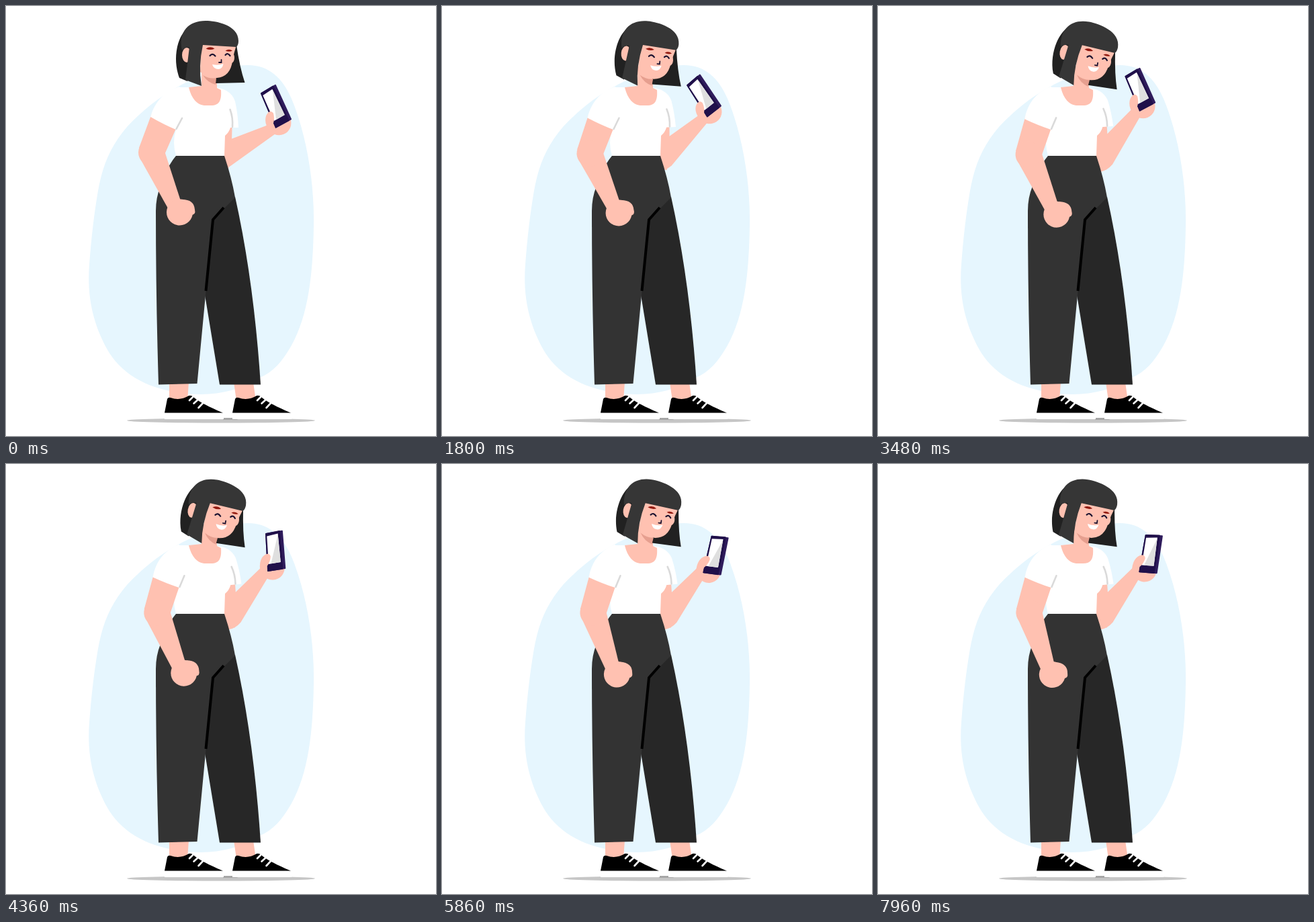
Write an HTML page that moves like this. It is 640 by 640 pixels and loops after 8 s.

```html
<!DOCTYPE html>
<html lang="en">
<head>
<meta charset="utf-8">
<title>Woman with phone</title>
<style>
  html, body { margin: 0; width: 100%; height: 100%; overflow: hidden; background: #fff; }
  svg { display: block; width: 100vw; height: 100vh; }
  .skin { fill: #ffc1b1; }
  .white { fill: #fff; }
  .hair { fill: #363636; }
  .back { fill: #212121; }
  .fold { fill: none; stroke: #dadada; stroke-width: 2.6; stroke-linecap: round; }
  .line { fill: none; stroke-linecap: round; }
</style>
</head>
<body>
<svg viewBox="0 0 640 640">
  <path fill="#e6f6fe" d="M360 88C392 88 412 108 425 138C447 190 459 262 458 325C457 400 450 460 425 505C412 528 398 545 378 553C350 570 322 578 290 578C225 577 174 554 150 510C126 466 121 425 124 385C127 345 131 310 137 275C144 235 157 207 180 180C210 148 245 122 290 104C315 94 340 88 360 88Z"/>
  <ellipse cx="320" cy="617" rx="140" ry="3.6" fill="#c6c6c6"/>
  <path fill="#a6a6a6" d="M323 613h14l9 3h-23z"/>

  <!-- far arm -->
  <g id="farUpper">
    <path class="skin" d="M318 165H337L336 200Q338 222 330 245L318 240Z"/>
    <path class="white" d="M305 121Q334 121 341 142Q345 160 346 181H328Z"/>
  </g>
  <path id="farFore" class="skin" d="M78 -7L0 -17H-18L-30 12Q-22 19 -10 19.500L78 8Z"/>
  <g id="hand">
    <circle class="skin" cx="8" cy="-5" r="18"/>
    <g stroke-width="2" stroke-linejoin="round">
      <path fill="#2f1c5c" stroke="#2f1c5c" d="M1 -1V-56L25 -59L26.500 -3.500Z"/>
      <path fill="#20104a" stroke="#20104a" d="M1 -1V-56L21 -59L22.500 -3Z"/>
    </g>
    <path class="white" d="M2 -52.500L18.500 -55.500L20.500 -13L2.500 -11Z"/>
    <path fill="#dfdfdf" d="M18.500 -54L20.500 -13L6 -11.400Z"/>
    <path class="skin" d="M6 -22Q5 -27 0 -26Q-6 -24 -9 -17Q-12 -10 -10 2L0 1V-8Q5 -14 6 -22Z"/>
  </g>

  <!-- legs -->
  <path class="skin" d="M243 560H272L270 588H243ZM339 560H368L372 588H343Z"/>
  <g id="shoe">
    <path class="white" d="M236 605H324V615H236Z"/>
    <path d="M236 605.500L240 585Q241 582 245 583Q259 588 272 580Q276 579 279 582C286 588 296 594 323 605.500Z"/>
    <path class="line" stroke="#fff" stroke-width="2.6" d="M273 587L278 582M279.500 591.500L285 586.500M286.500 598L293.500 590.500"/>
  </g>
  <use href="#shoe" x="101"/>
  <path fill="#272727" d="M341 284Q369 410 379 563.500H318L296 430L308 316Z"/>
  <path fill="#333" d="M253 223H325Q336 256 341 285L308 318L297 430L284.500 562L227 563.500Q223 430 223 305Q223 285 230 268Q240 238 253 223Z"/>
  <path fill="none" stroke="#000" stroke-width="4" d="M324 300L308 318L297.500 424"/>

  <!-- torso and neck -->
  <path class="white" d="M256 121H312Q328 124 332 150L334 181Q332 188 326 193L325 223H253Q247 203 253 184Z"/>
  <path id="farFold" class="fold" d="M333.500 154Q338 166 337 180"/>
  <path class="skin" d="M272 121L291 119V90H314V122L320 125C321 140 318 148 305 148H297C285 148 276 138 272 121Z"/>

  <!-- near arm -->
  <g id="nearUpper">
    <g id="nearFore" class="skin">
      <path d="M199 226L241 301L260 290L236 216Z"/>
      <circle cx="258.500" cy="307" r="19.500"/>
      <path d="M262 288Q280 288 281 303Q283 311 275 311Z"/>
    </g>
    <path class="skin" d="M217 160L198 211L216 232L236 221L255 178Z"/>
    <circle class="skin" cx="216.500" cy="218" r="19.500"/>
    <path class="white" d="M258 120C238 126 222 140 215 165Q236 177 253 184L262 167L275 140Z"/>
    <path class="fold" d="M262 167L253.500 183"/>
  </g>

  <g id="head">
    <path class="back" d="M268 36C258 42 246 75 258 107L270 112L290 60ZM343 58Q348 92 355.500 114L312 115V60Z"/>
    <ellipse class="skin" cx="269" cy="73" rx="7" ry="11"/>
    <ellipse class="skin" cx="335" cy="77" rx="5" ry="8"/>
    <path class="skin" d="M290 54L343 58Q339 70 337 82Q334 105 314 107Q300 108 289 98Z"/>
    <path fill="#e69f8f" d="M293 103Q303 109 313 107L312 117Q300 114 293 103Z"/>
    <path class="hair" d="M262 66C256 38 272 22 297 22C312 22 346 28 346 52Q346 58 343 61L293 58Q286 90 291 119L267 110L273 61Q266 61 262 66Z"/>
    <path fill="#931a10" d="M297.500 63.500Q304 59 310.500 63.500Q304 66.500 297.500 63.500ZM326.500 66.500Q332 63 337 66.500Q332 69 326.500 66.500Z"/>
    <path class="line" stroke="#1b1230" stroke-width="2.200" d="M303.500 74Q307 69.500 311.500 74.500M326.500 73Q330 69 333.500 74"/>
    <path class="line" stroke="#1b1230" stroke-width="1.800" d="M320.500 80V84H317"/>
    <path class="white" d="M307 87Q316 89 323.500 86Q322 94 316 94Q309 94 307 87Z"/>
  </g>
</svg>
<script>
const LOOP = 8000;
const times = [0, 1240, 2360, 3480, 4360, 5860, 7960];
const poses = {
  head:  [0, 3, 8, 10, 10, 9, 9],
  arm:   [0, -1.3, -3.2, -4.8, -5.2, -5.3, -5.3],
  elbow: [0, 0.8, 2.5, 5, 6.5, 9.5, 10.2],
  x:     [401, 398, 391, 389, 389, 388, 388],
  y:     [182, 173, 160, 157, 160, 162, 161],
  phone: [-23, -29, -34.5, -22.5, -3, 13, 10]
};

const slope = (v, i) => (v[i + 1] - v[i]) / (times[i + 1] - times[i]);

// Tangent that never overshoots: flat at extremes, harmonic mean elsewhere.
function tangent(v, i) {
  if (i === 0) return slope(v, 0);
  if (i === v.length - 1) return slope(v, i - 1);
  const a = slope(v, i - 1), b = slope(v, i);
  return a * b <= 0 ? 0 : 2 * a * b / (a + b);
}

function sample(v, t) {
  t = Math.min(t, times[times.length - 1]);
  let i = 0;
  while (i < times.length - 2 && t >= times[i + 1]) i++;
  const h = times[i + 1] - times[i], u = (t - times[i]) / h, w = 1 - u;
  return v[i] * (1 + 2 * u) * w * w + v[i + 1] * u * u * (3 - 2 * u)
       + h * u * w * (tangent(v, i) * w - tangent(v, i + 1) * u);
}

const place = (id, transform) =>
  document.getElementById(id).setAttribute("transform", transform);

function draw(t) {
  const p = {};
  for (const key in poses) p[key] = sample(poses[key], t);

  place("head", `rotate(${p.head} 297 120)`);
  place("nearUpper", `rotate(${p.arm} 256 129)`);
  place("nearFore", `rotate(${p.elbow} 216.5 219)`);
  place("farUpper", `rotate(${p.arm} 322 130)`);
  place("farFold", `rotate(${p.arm} 322 130)`);
  place("hand", `translate(${p.x} ${p.y}) rotate(${p.phone})`);

  // The far forearm spans from the elbow to the wrist.
  const a = p.arm * Math.PI / 180;
  const ex = 322 + 10.5 * Math.cos(a) - 87 * Math.sin(a);
  const ey = 130 + 10.5 * Math.sin(a) + 87 * Math.cos(a);
  const aim = Math.atan2(p.y + 1 - ey, p.x - 5 - ex) * 180 / Math.PI;
  place("farFore", `translate(${ex} ${ey}) rotate(${aim})`);
}

const start = performance.now();
function tick(now) {
  draw(Math.max(0, now - start) % LOOP);
  requestAnimationFrame(tick);
}
tick(start);
</script>
</body>
</html>
```
